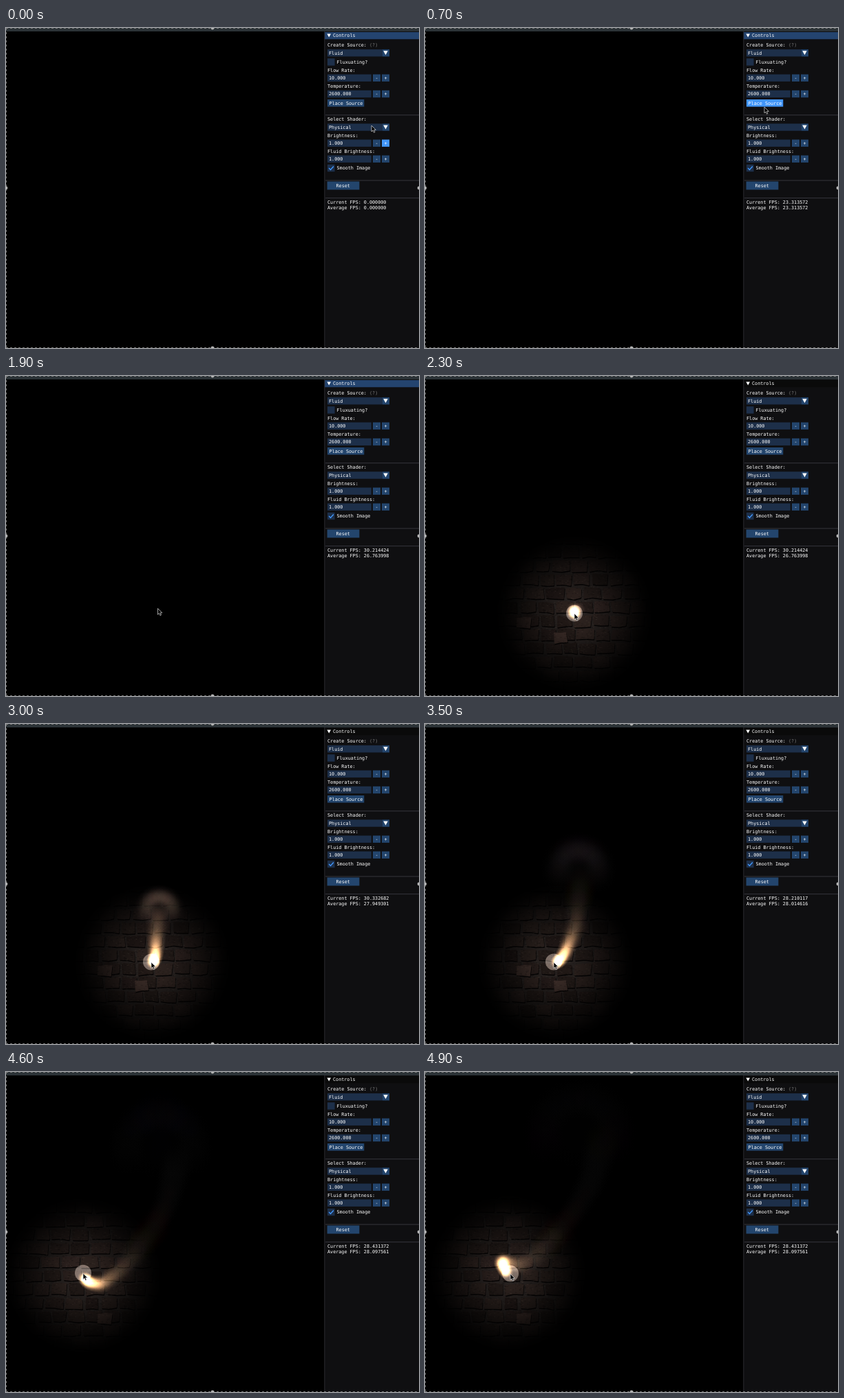
An HTML page with a canvas that plays this animation: 600 by 466 pixels, repeating every 5 s.

```html
<!DOCTYPE html>
<html lang="en">
<head>
<meta charset="utf-8">
<title>Fluid light demo</title>
<style>
  html, body { margin: 0; width: 100%; height: 100%; overflow: hidden; background: #000; }
  canvas, svg { position: absolute; left: 0; top: 0; width: 600px; height: 466px; }
  text {
    font: 6.75px "DejaVu Sans Mono", "Liberation Mono", monospace;
    fill: #fff; white-space: pre; text-rendering: geometricPrecision;
  }
</style>
</head>
<body>
<canvas id="scene" width="600" height="466"></canvas>
<svg id="ui" viewBox="0 0 600 466" xmlns="http://www.w3.org/2000/svg"></svg>
<script>
const LOOP = 5000, STEP = 100, START = 2200;
const W = 600, H = 466;
const FIELD = '#1d2f49', BUTTON = '#23456d', HOT = '#4296fa', RULE = '#3f3f47';

const ui = document.getElementById('ui');
const ctx = document.getElementById('scene').getContext('2d');

// Each row is [time, ...values]
const POINTER = [
  [0, 531, 142], [200, 517, 130], [500, 496, 116], [900, 490, 114], [1300, 489, 115],
  [1400, 455, 141], [1600, 310, 262], [1800, 224, 332], [2000, 217, 345],
  [2300, 217, 346], [2800, 217, 347], [3000, 211, 347], [3250, 202, 347],
  [3500, 187, 347], [3850, 167, 345], [4200, 138, 335], [4400, 121, 314],
  [4550, 112, 296], [4700, 112, 288], [4800, 117, 291], [4900, 124, 294]
];
// Rising cap: y, radius, brightness
const CAP = [
  [2200, 346, 8, 0], [2400, 335, 14, 24], [2700, 304, 25, 34], [3000, 270, 34, 25],
  [3500, 211, 50, 8], [4200, 133, 72, 2.6], [4900, 88, 86, 1.5]
];
// Current and average readings
const RATES = [
  [0, '0.000000', '0.000000'], [200, '23.313572', '23.313572'],
  [1300, '30.214424', '26.763998'], [2400, '30.332682', '27.949301'],
  [3500, '28.210117', '28.014616'], [4600, '28.431372', '28.097561']
];

function sample(keys, t) {
  const i = keys.findIndex(k => k[0] >= t);
  if (i === 0) return keys[0].slice(1);
  if (i < 0) return keys[keys.length - 1].slice(1);
  const a = keys[i - 1], b = keys[i], f = (t - a[0]) / (b[0] - a[0]);
  return a.slice(1).map((v, j) => v + (b[j + 1] - v) * f);
}

/* ---------- interface ---------- */

function add(tag, attrs, content) {
  const el = document.createElementNS('http://www.w3.org/2000/svg', tag);
  for (const k in attrs) el.setAttribute(k, attrs[k]);
  if (content) el.textContent = content;
  ui.appendChild(el);
  return el;
}
const box = (x, y, w, h, fill) => add('rect', { x, y, width: w, height: h, fill });
const label = (x, mid, str, fill = '#fff') => add('text', { x, y: mid + 2.4, style: 'fill:' + fill }, str);
const rule = y => box(464, y, 136, 0.8, RULE);
const arrow = (x, y, s) => add('path', { d: `M${x - s} ${y - s * 0.8}h${2 * s}l${-s} ${1.8 * s}z`, fill: '#fff' });

function combo(mid, str) {
  box(467, mid - 5.2, 80, 10.4, FIELD);
  box(547, mid - 5.2, 10, 10.4, BUTTON);
  arrow(551.5, mid - 0.3, 3.3);
  label(469, mid, str);
}
function stepper(mid, str) {
  box(467, mid - 5.2, 63.7, 10.4, FIELD);
  label(469, mid, str);
  box(533, mid - 5.2, 11, 10.4, BUTTON);
  label(536.5, mid, '-');
  const plus = box(546, mid - 5.2, 11, 10.4, BUTTON);
  label(549.5, mid, '+');
  return plus;
}
function check(mid, str, on) {
  box(467, mid - 5.2, 10.6, 10.4, FIELD);
  if (on) add('path', { d: `M469.2 ${mid}l2.3 2.5l4.4 -5`, fill: 'none', stroke: HOT, 'stroke-width': 1.4 });
  label(480.5, mid, str);
}

box(0, 0, W, 5, '#2b3236');
box(463, 5, 137, 461, '#0f0f11');
const titleBar = box(463, 6, 137, 10.3, '#24446f');
box(462.4, 5, 0.9, 461, '#303036');
arrow(469.2, 10.8, 2.8);
label(475, 11, 'Controls');
label(467, 25, 'Create Source:');
label(528, 25, '(?)', '#777');
combo(36.3, 'Fluid');
check(49.5, 'Fluxuating?', false);
label(467, 61.5, 'Flow Rate:');
stepper(72.7, '10.000');
label(467, 84.7, 'Temperature:');
stepper(96, '2600.000');
const place = box(467, 104, 53.3, 10.6, BUTTON);
label(469.5, 109.3, 'Place Source');
rule(126.4);
label(467, 133, 'Select Shader:');
combo(144.5, 'Physical');
label(467, 156.2, 'Brightness:');
const brighter = stepper(167.7, '1.000');
label(467, 179.5, 'Fluid Brightness:');
stepper(190.7, '1.000');
check(204, 'Smooth Image', true);
rule(221.6);
box(466.6, 223.5, 46.8, 12, BUTTON);
label(479.5, 229.5, 'Reset');
rule(247.3);
const current = label(467, 254, ' ');
const average = label(467, 261.7, ' ');

add('path', {
  d: 'M0 .5H600M.5 0V466M0 465.5H600', fill: 'none',
  stroke: '#808080', 'stroke-width': 0.9, 'stroke-dasharray': '3 3'
});
for (const [cx, cy] of [[300, 0], [300, 466], [0, 233], [600, 233]])
  add('circle', { cx, cy, r: 2.4, fill: '#b4b4b4' });

const pointer = add('path', {
  d: 'M0 0V8.9L2 7L3.4 10.2L5 9.5L3.6 6.4H6.4Z',
  fill: '#050505', stroke: '#ddd', 'stroke-width': 0.7
});

/* ---------- brick wall ---------- */

function layer() {
  const c = document.createElement('canvas');
  c.width = W; c.height = H;
  return c.getContext('2d');
}

function makeWall() {
  const g = layer();
  let seed = 71;
  const rnd = () => (seed = (seed * 16807) % 2147483647) / 2147483647;
  const jitter = () => (rnd() - 0.5) * 2.6;
  const brick = (x, y, w, h, k) => {
    const p = new Path2D();
    [[0, 0], [w / 2, 0], [w, 0], [w, h], [w / 2, h], [0, h]]
      .forEach(([dx, dy]) => p.lineTo(x + dx + jitter(), y + dy + jitter()));
    p.closePath();
    const paint = color => {
      g.fillStyle = g.strokeStyle = color;
      g.fill(p);
      g.stroke(p);
    };
    g.save();
    g.translate(0.6, 1.5);
    paint('#070505');
    g.restore();
    paint(`rgb(${[54, 41, 37].map(v => Math.round(v * k))})`);
  };
  g.fillStyle = '#2a2422';
  g.fillRect(0, 0, W, H);
  g.lineWidth = 2;
  g.lineJoin = 'round';
  for (let row = 0, y = 147; y < H; y += 20, row++) {
    let x = -10 + (row % 2) * 13;
    while (x < 440) {
      const w = 22 + rnd() * 9, lift = rnd() * 1.6;
      brick(x + 2.5, y + 2 + lift, w - 5.5, 13.5, 0.62 + rnd() * 0.38);
      x += w;
    }
  }
  brick(135, 352, 18, 14, 1.2);
  brick(189, 374, 16, 14, 1.2);
  for (let i = 0; i < 9000; i++) {
    g.fillStyle = rnd() < 0.6 ? 'rgba(0,0,0,.24)' : 'rgba(170,145,130,.1)';
    g.fillRect(rnd() * 440, 147 + rnd() * 319, 1 + rnd() * 2, 1);
  }
  return g.canvas;
}
const wall = makeWall(), lit = layer();

/* ---------- light and smoke ---------- */

function glow(x, y, r, rgb, amp) {
  const shade = k => `rgb(${rgb.map(v => Math.min(255, v * amp * k).toFixed(2))})`;
  const g = ctx.createRadialGradient(x, y, 0, x, y, r);
  g.addColorStop(0, shade(1));
  g.addColorStop(0.35, shade(0.78));
  g.addColorStop(0.7, shade(0.22));
  g.addColorStop(1, '#000');
  ctx.fillStyle = g;
  ctx.fillRect(x - r, y - r, 2 * r, 2 * r);
}

function drawWall(x, y) {
  lit.globalCompositeOperation = 'copy';
  lit.drawImage(wall, 0, 0);
  const g = lit.createRadialGradient(x, y, 0, x, y, 114);
  [[0, 1], [0.25, 0.84], [0.5, 0.54], [0.75, 0.23], [0.9, 0.06], [1, 0]]
    .forEach(([p, a]) => g.addColorStop(p, `rgba(0,0,0,${a})`));
  lit.globalCompositeOperation = 'destination-in';
  lit.fillStyle = g;
  lit.fillRect(0, 0, W, H);
  ctx.drawImage(lit.canvas, 0, 0);
}

function drawCap(t) {
  const [y, r, amp] = sample(CAP, t);
  const cool = Math.min(1, Math.max(0, (t - 3000) / 1200));
  const rgb = [1, 0.8 + 0.06 * cool, 0.68 + 0.5 * cool];
  const x = 222 + (t - START) * 0.001;
  for (let i = 0; i <= 10; i++) {
    const a = Math.PI * (0.9 + 1.2 * i / 10);
    const k = 0.45 + 0.55 * Math.max(0, -Math.sin(a));
    glow(x + Math.cos(a) * r * 0.62, y + Math.sin(a) * r * 0.58, r * 0.5, rgb, amp * k);
  }
  glow(x, y, r * 0.9, rgb, amp * 0.7);
}

function drawPlume(t) {
  const oldest = (t - START) / 1000;
  let dt = 0.012;
  for (let a = 0; a < oldest; a += dt) {
    dt = 0.012 + a * 0.03;
    // Gas leaves slightly behind the dragged source, then accelerates upward
    const [x, y] = sample(POINTER, t - a * 1000 - 80);
    const rise = 95 * a * a / (a + 0.06);
    const heat = 92 * Math.exp(-a / 0.16);
    const smoke = 2.5 * Math.exp(-a / 0.85);
    const warm = heat / (heat + smoke);
    const rgb = [1, 0.8 - 0.05 * warm, 0.7 - 0.22 * warm];
    glow(x + 6 * a * a, y - rise, 10.5 + a * 12, rgb, (heat + smoke) * dt / 0.012);
  }
}

function drawScene(t, x, y) {
  ctx.globalCompositeOperation = 'source-over';
  ctx.fillStyle = '#000';
  ctx.fillRect(0, 0, W, H);
  if (t < START) return;
  const [lx, ly] = sample(POINTER, Math.max(START, t - 50));
  drawWall(lx, ly);
  ctx.globalCompositeOperation = 'lighter';
  drawCap(t);
  ctx.fillStyle = 'rgba(225,208,195,.4)';
  ctx.beginPath();
  ctx.arc(x, y - 0.5, 12, 0, 2 * Math.PI);
  ctx.fill();
  drawPlume(t);
}

function render(t) {
  const [x, y] = sample(POINTER, t);
  const rate = RATES.filter(r => r[0] <= t).pop();
  drawScene(t, x, y);
  pointer.setAttribute('transform', `translate(${x} ${y})`);
  titleBar.setAttribute('fill', t < START ? '#24446f' : '#0a0a0a');
  place.setAttribute('fill', t >= 400 && t < 1400 ? HOT : BUTTON);
  brighter.setAttribute('fill', t < 100 ? HOT : BUTTON);
  current.textContent = 'Current FPS: ' + rate[1];
  average.textContent = 'Average FPS: ' + rate[2];
}

let shown = -1;
function tick() {
  const t = Math.floor(performance.now() % LOOP / STEP) * STEP;
  if (t !== shown) render(shown = t);
  requestAnimationFrame(tick);
}
tick();
</script>
</body>
</html>
```
